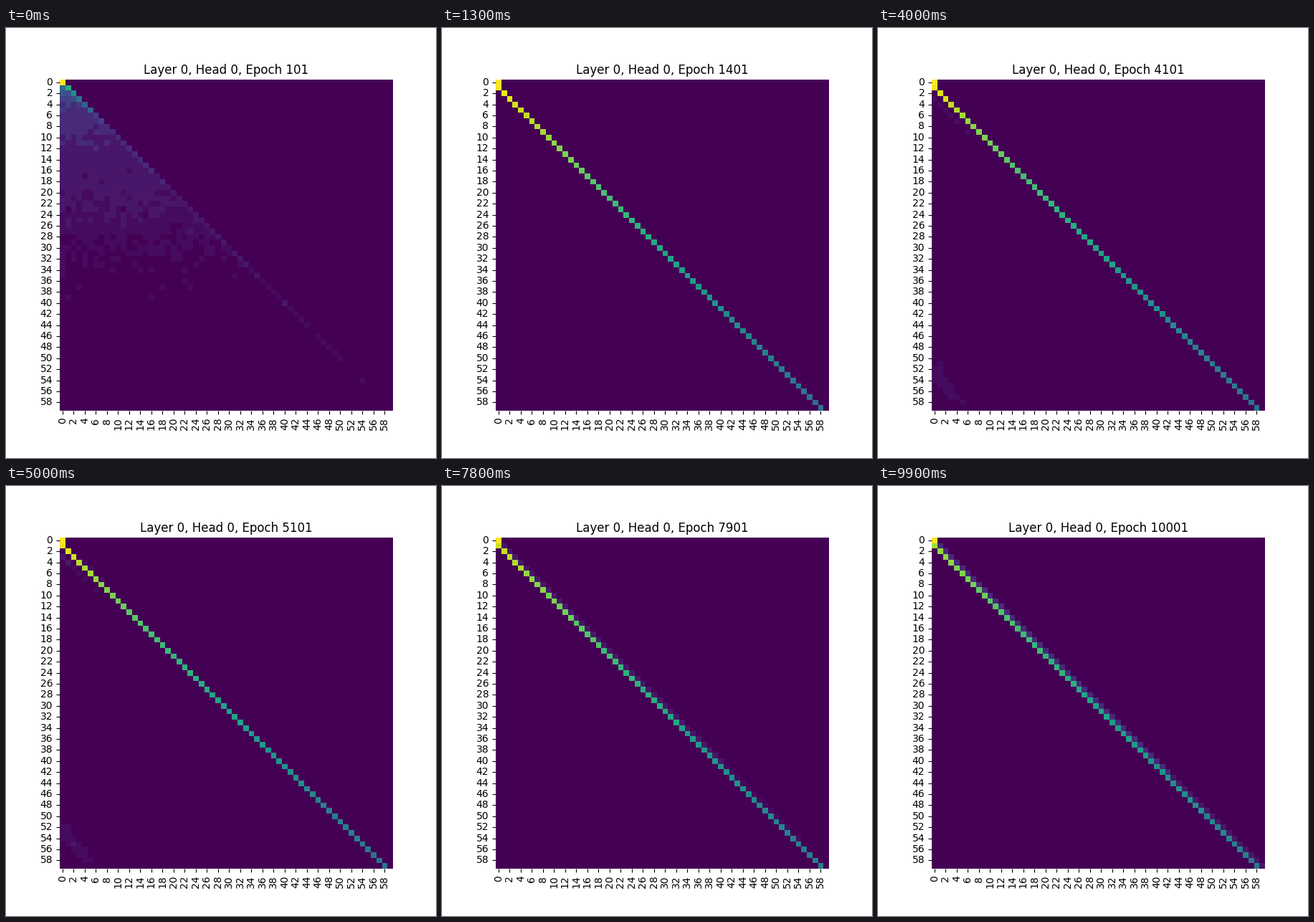
A matplotlib script that plays this animation: 600x600 px, repeating every 10 s.

```python
import numpy as np
import matplotlib.pyplot as plt
from matplotlib.animation import FuncAnimation

SIZE, FRAMES, INTERVAL = 60, 100, 100
SEED = 7
FLOOR, FAINT = 0.031, 0.17

rows = np.arange(SIZE)
R, C = np.meshgrid(rows, rows, indexing="ij")
causal = C <= R
diag = rows, rows
prev = rows[1:], rows[:-1]

base = np.random.default_rng(SEED)
grain = base.standard_normal((SIZE, SIZE))
phase = base.uniform(0, 2 * np.pi, SIZE)
speed = base.uniform(0.5, 1.5, SIZE)


def bell(x, center, width):
    return np.exp(-((x - center) / width) ** 2)


def banded(w):
    """Hide the lowest weights and step the faint ones by doubling."""
    step = 0.03 * 2 ** np.round(np.log2(np.maximum(w, FLOOR) / 0.03))
    return np.where(w < FLOOR, 0, np.where(w < FAINT, step, w))


def attention(i):
    epoch = 101 + 100 * i
    t = i / (FRAMES - 1)

    # Each row learns to look at the token before it.
    learned = 1 / (1 + np.exp(-(epoch - 480 - 2 * rows) / 65))
    main = (1 - 0.15 * t ** 4) * np.exp(-(0.0175 - 0.0048 * t ** 2) * rows)
    main -= 0.07 * np.sin(np.pi * t) ** 2 * rows / 11 * np.exp(1 - rows / 11)
    main += 0.02 * t * np.sin(phase + speed * epoch / 700)
    main = np.clip(learned * main, 0, 1)

    # Late in training some weight returns to the token itself.
    own = learned * 0.14 * t ** 4 * bell(rows, 0, 55)
    rest = np.clip(1 - main - own, 0, 1)

    # What is left spreads evenly over the past.
    w = causal.astype(float)
    w[diag] += (1 - learned) * (0.65 + 0.35 * np.exp(-rows / 10))
    w *= (rest / w.sum(axis=1))[:, None]

    # Passing patches: lower left corner and three tokens back.
    stray = 0.031 * bell(t, 0.5, 0.36)
    w += stray * bell(C, np.maximum(0, R - 53), 2.4) * bell(R, 55, 6)
    w += stray * np.exp(-R / 9) * (R - C == 3)

    fresh = np.random.default_rng([SEED, i]).standard_normal((SIZE, SIZE))
    w *= 1 + 0.08 * (0.8 * grain + 0.6 * fresh)
    w[diag] += own
    w[prev] += main[1:]
    w[0, 0] = 1
    return banded(np.where(causal, np.clip(w, 0, 1), 0))


plt.rcParams["text.kerning_factor"] = 6
fig, ax = plt.subplots(figsize=(6, 6), dpi=100)
mesh = ax.pcolormesh(attention(0), cmap="viridis", vmin=0, vmax=1)
ax.set(xlim=(0, SIZE), ylim=(SIZE, 0))
ax.spines[:].set_visible(False)
ticks = rows[::2]
ax.set_xticks(ticks + 0.5, ticks, rotation=90)
ax.set_yticks(ticks + 0.5, ticks, va="center")
title = ax.set_title("")


def update(i):
    mesh.set_array(attention(i))
    title.set_text(f"Layer 0, Head 0, Epoch {101 + 100 * i}")
    return mesh, title


anim = FuncAnimation(fig, update, frames=FRAMES, interval=INTERVAL, repeat=True)
plt.show()
```
